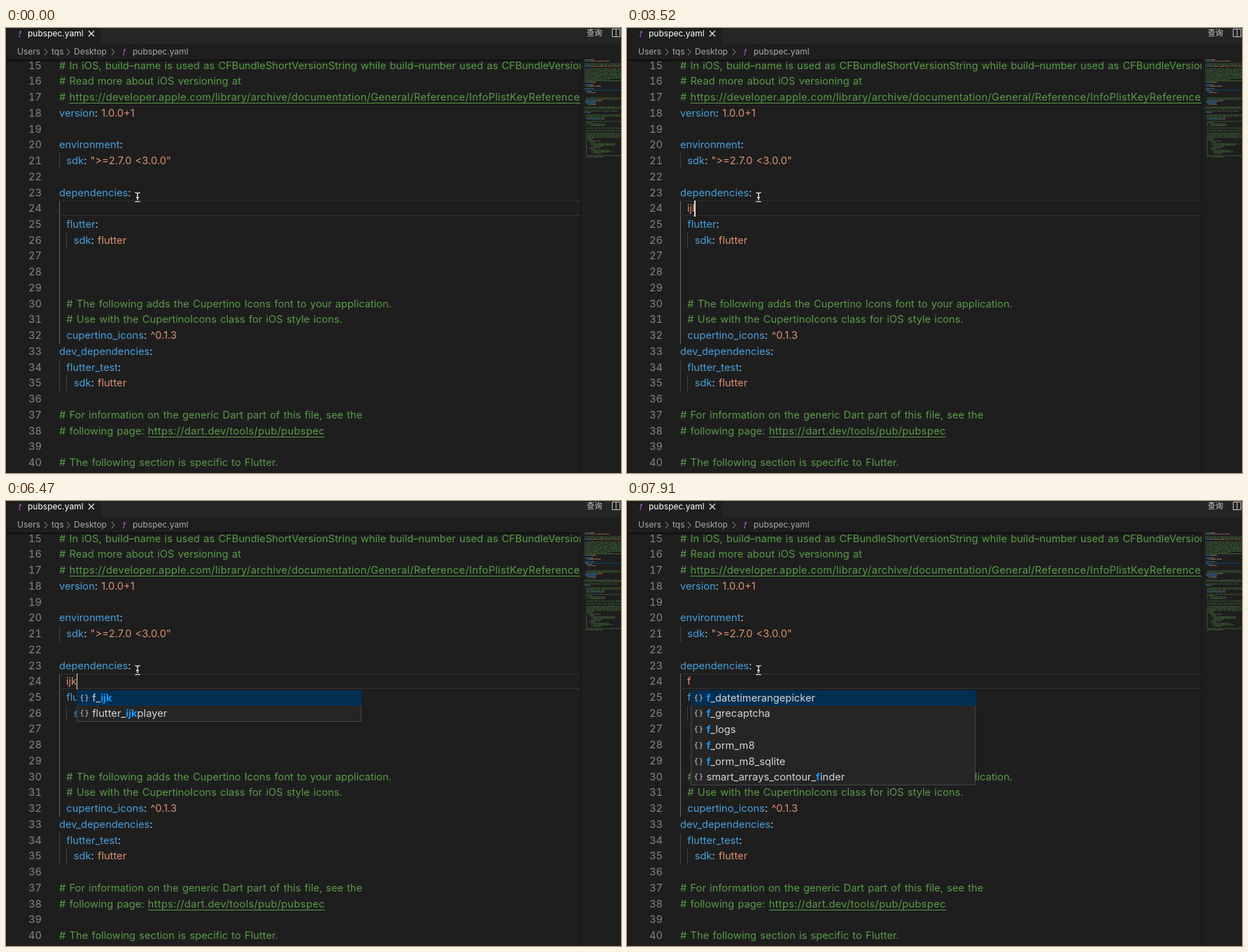
These frames come from a looping animation (879 by 637 pixels, 8 s). An HTML page with a canvas:

```html
<!DOCTYPE html>
<html lang="en">
<head>
<meta charset="utf-8">
<title>pubspec.yaml</title>
<style>
html, body { margin: 0; width: 100%; height: 100%; overflow: hidden; background: #1e1e1e; }
body { position: relative; font: 14.7px Inter, "Noto Sans CJK SC", sans-serif; color: #d4d4d4; }
body > *, .row, .num, .guide, .popup { position: absolute; white-space: pre; }
.tabs { left: 136px; top: 0; right: 0; height: 23px; background: #252526; }
.label { font-size: 12px; line-height: 20px; color: #a9a9a9; }
.mark { color: #a45cc8; font: italic 700 13px/20px "Noto Serif", serif; }
#editor { left: 0; top: 45px; width: 821px; height: 592px; overflow: hidden; word-spacing: 1.05px; }
.row { left: 76px; width: 745px; height: 22.74px; line-height: 22.74px; }
.num { left: -76px; width: 51px; text-align: right; color: #858585; font-variant-numeric: tabular-nums; }
.current { z-index: 2; }
.current::before { content: ""; position: absolute; inset: 0 0 1px; box-sizing: border-box; border: solid #303030; border-width: 1px 0; }
.guide { width: 1px; background: #424242; }
.comment { color: #579c47; }
.comment u { letter-spacing: .29px; text-underline-offset: 3px; text-decoration-thickness: 1px; }
.key { color: #489fdb; }
.value { color: #dd9070; }
#typed { position: relative; margin-left: 10px; }
#caret { position: relative; display: inline-block; width: 1.5px; height: 22.74px; margin-left: -.5px; vertical-align: top; }
.popup { left: .5px; top: 23.4px; width: 407px; background: #252526; outline: 1px solid #454545; outline-offset: -1px; }
.popup div { height: 22.74px; padding-left: 22px; position: relative; }
.popup div:first-child { background: #002f52; }
.popup b { color: #1795f5; }
.popup i { position: absolute; left: 4px; font: 11px/22px "DejaVu Sans Mono", monospace; letter-spacing: .5px; color: #c5c5c5; }
.shade { left: 0; top: 45px; width: 821px; height: 4px; background: linear-gradient(#0009, #0000); }
.edge { left: 821px; top: 45px; width: 1px; bottom: 0; background: #131313; }
.side { left: 0; top: 0; width: 1px; bottom: 0; background: #111; }
#map { left: 822px; top: 45px; }
svg { left: 0; top: 0; fill: none; stroke: #c5c5c5; }
</style>
</head>
<body>
<div class="tabs"></div>
<span class="mark" style="left:17px;top:-2px">!</span>
<span class="label" style="left:31px;top:-2px;color:#fff">pubspec.yaml</span>
<span class="label" style="left:830px;top:-3px;font-size:11px;color:#ccc">查询</span>
<span class="label" style="left:16px;top:24px">Users</span>
<span class="label" style="left:65px;top:24px">tqs</span>
<span class="label" style="left:97px;top:24px">Desktop</span>
<span class="mark" style="left:166px;top:24px">!</span>
<span class="label" style="left:181px;top:24px">pubspec.yaml</span>
<div id="editor"></div>
<div class="shade"></div>
<div class="edge"></div>
<canvas id="map" width="57" height="592"></canvas>
<div class="side"></div>
<svg width="879" height="637">
  <path d="M55 30l4 4.5-4 4.5M87 30l4 4.5-4 4.5M151 30l4 4.5-4 4.5" stroke="#a0a0a0"/>
  <path d="M118 4l8 8m0-8l-8 8" stroke="#e8e8e8" stroke-width="1.3"/>
  <path d="M866.5 1.5h11v11h-11zM872 1.5v11"/>
  <path d="M184.5 235.700q3.500 0 3.500 2q0-2 3.500-2M188 237v9.500M184.500 248.700q3.500 0 3.500-2q0 2 3.500 2M186 242.700h4" stroke="#fff" stroke-width="1.2"/>
</svg>
<script>
const file = `name: demo_app
description: A new Flutter project.

# The following line prevents the package from being accidentally published
# pub.dev using pub publish. This is preferred for private packages.
publish_to: 'none' # Remove this line if you wish to publish

# The following defines the version and build number for your application.
# A version number is three numbers separated by dots, like 1.2.43
# followed by an optional build number separated by a +.
# Both the version and the builder number may be overridden in flutter
# build by specifying --build-name and --build-number, respectively.
# In Android, build-name is used as versionName while build-number used as
# Read more about Android versioning at the following page
# In iOS, build–name is used as CFBundleShortVersionString while build–number used as CFBundleVersion.
# Read more about iOS versioning at
# https://developer.apple.com/library/archive/documentation/General/Reference/InfoPlistKeyReference/Articles/CoreFoundationKeys.html
version: 1.0.0+1

environment:
  sdk: ">=2.7.0 <3.0.0"

dependencies:

  flutter:
    sdk: flutter



  # The following adds the Cupertino Icons font to your application.
  # Use with the CupertinoIcons class for iOS style icons.
  cupertino_icons: ^0.1.3
dev_dependencies:
  flutter_test:
    sdk: flutter

# For information on the generic Dart part of this file, see the
# following page: https://dart.dev/tools/pub/pubspec

# The following section is specific to Flutter.
flutter:

  # The following line ensures that the Material Icons font is
  # included with your application, so that you can use the icons in
  # the material Icons class.
  uses-material-design: true

  # To add assets to your application, add an assets section, like this:
  # assets:
  #   - images/a_dot_burr.jpeg
  #   - images/a_dot_ham.jpeg

  # An image asset can refer to one or more resolution-specific variants

  # For details regarding adding assets from package dependencies, see

  # To add custom fonts to your application, add a fonts section here,
  # in this "flutter" section. Each entry in this list should have a
  # "family" key with the font family name, and a "fonts" key with a
  # list giving the asset and other descriptors for the font. For
  # example:
  # fonts:
  #   - family: Schyler
  #     fonts:
  #       - asset: fonts/Schyler-Regular.ttf
  #       - asset: fonts/Schyler-Italic.ttf
  #         style: italic
  #   - family: Trajan
  #     fonts:
  #       - asset: fonts/Trajan.ttf
  #       - asset: fonts/Trajan_Bold.ttf
  #         weight: 700
  #
  # For details regarding fonts from package dependencies,
  # see the following page`.split('\n');

const FIRST = 15, LAST = 40, CURRENT = 24, ROW = 22.74, LOOP = 8000;
const rowTop = n => (n - FIRST) * ROW - 2.4;
const $ = id => document.getElementById(id);
const esc = s => s.replace(/</g, '&lt;');

function highlight(line) {
  if (/^\s*#/.test(line))
    return `<span class="comment">${line.replace(/https:\S+/, '<u>$&</u>')}</span>`;
  const [, key, value] = line.match(/^(.*?):(.*)$/) || [];
  return key ? `<span class="key">${key}</span>:<span class="value">${esc(value)}</span>` : '';
}

let html = '';
for (let n = FIRST; n <= LAST; n++) {
  const current = n === CURRENT;
  const body = current ? '<span class="value" id="typed"></span><span id="caret"></span>' : highlight(file[n - 1]);
  html += `<div class="row ${current ? 'current' : ''}" style="top:${rowTop(n)}px"><span class="num">${n}</span>${body}</div>`;
}
// Indent guides: x, first line, last line, colour
for (const [x, from, to, color] of [[76, 21, 21], [76, 24, 32, '#686868'], [86, 26, 26], [76, 34, 35], [86, 35, 35]])
  html += `<div class="guide" style="left:${x}px;top:${rowTop(from)}px;height:${(to - from + 1) * ROW}px;background:${color || ''}"></div>`;
$('editor').innerHTML = html;

const ctx = $('map').getContext('2d');
function drawMap(typed) {
  ctx.clearRect(0, 0, 57, 592);
  ctx.fillStyle = '#123b55';
  ctx.fillRect(4, (CURRENT - 1) * 1.88, 53, 1.5);
  file.forEach((line, i) => {
    const text = i === CURRENT - 1 ? '  ' + typed : line;
    const colon = text.indexOf(':'), comment = /^\s*#/.test(text);
    [...text.slice(0, 53)].forEach((c, x) => {
      if (c === ' ') return;
      ctx.fillStyle = comment ? '#579c4799' : x < colon ? '#489fdbaa' : '#dd9070aa';
      ctx.fillRect(5 + x, i * 1.88, 1, /[a-z.,]/.test(c) ? .9 : 1.3);
    });
  });
}

const players = ['f_ijk', 'flutter_ijkplayer'];
const all = ['f_datetimerangepicker', 'f_grecaptcha', 'f_logs', 'f_orm_m8', 'f_orm_m8_sqlite', 'smart_arrays_contour_finder'];

// Start time, typed text, caret shown, suggestions
const states = [
  [0, '', 0], [300, 'i', 1], [480, 'ij', 1], [690, 'ijk', 1],
  [1170, 'ijk', 0], [1670, 'ijk', 1], [2180, 'ijk', 0], [2660, 'ijk', 1], [3200, 'ijk', 0],
  [3400, 'ij', 1], [3520, 'ijl', 1], [4060, 'ij', 1], [4450, 'ijk', 1],
  [4560, 'ijk', 1, players], [4980, 'ijk', 0, players], [5490, 'ijk', 1, players],
  [5960, 'ijk', 0, players], [6470, 'ijk', 1, players], [6980, 'ij', 1, players],
  [7160, 'i', 1, players], [7260, '', 1], [7460, 'f', 1], [7910, 'f', 0, all]
];

function suggestion(name, typed) {
  const at = name.startsWith(typed) ? 0 : name.lastIndexOf(typed);
  return `<div><i>{}</i>${name.slice(0, at)}<b>${typed}</b>${name.slice(at + typed.length)}</div>`;
}

let shown;
function render(t) {
  const state = states.findLast(s => s[0] <= t);
  if (state === shown) return;
  shown = state;
  const [, typed, caret, list] = state;
  $('typed').textContent = typed;
  $('caret').style.background = caret ? '#e0e0e0' : 'none';
  $('caret').innerHTML = list ? `<div class="popup">${list.map(s => suggestion(s, typed)).join('')}</div>` : '';
  drawMap(typed);
}

const start = performance.now();
function frame() {
  render((performance.now() - start) % LOOP);
  requestAnimationFrame(frame);
}
frame();
</script>
</body>
</html>
```
